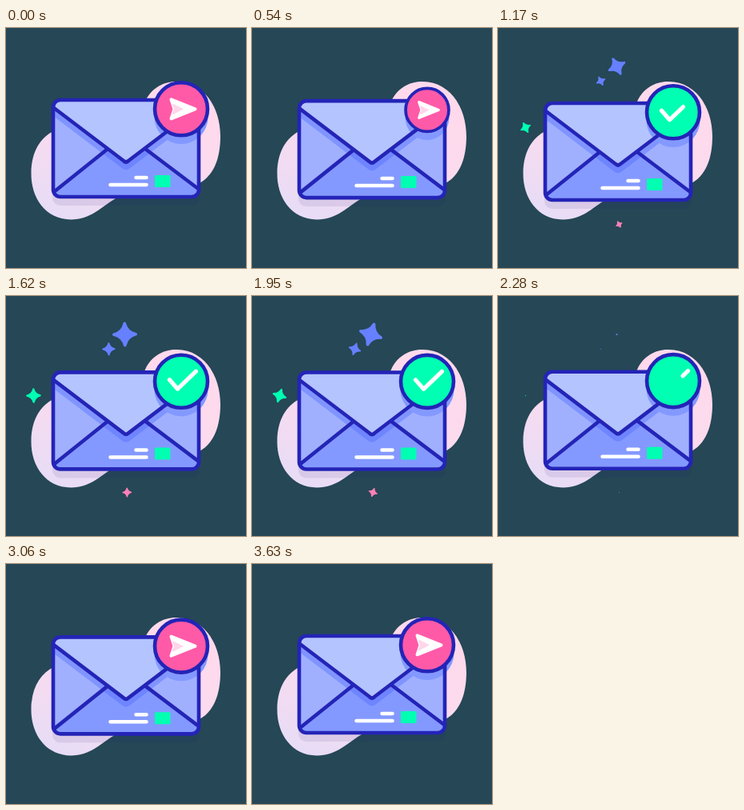
Write an HTML page that moves like this. It is 300 px wide and 300 px high and loops after 3660 ms.

```html
<!DOCTYPE html>
<html lang="en">
<head>
<meta charset="utf-8">
<title>Message sent</title>
<style>
  html, body { margin: 0; width: 100%; height: 100%; overflow: hidden; background: #254756; }
  svg { display: block; width: 100vw; height: 100vh; }
  .line { fill: none; stroke: #2424b7; stroke-width: 4.6; stroke-linejoin: round; stroke-linecap: round; }
  .white { fill: none; stroke: #fff; stroke-linecap: round; stroke-linejoin: round; }
</style>
</head>
<body>
<svg viewBox="0 0 300 300">
  <defs>
    <linearGradient id="blobFill" x1="0.8" y1="0" x2="0.2" y2="1">
      <stop offset="0" stop-color="#ffd9eb"/>
      <stop offset="0.5" stop-color="#fbdbee"/>
      <stop offset="1" stop-color="#e8dcf6"/>
    </linearGradient>
    <clipPath id="bodyClip"><rect x="59" y="90" width="182" height="121" rx="9"/></clipPath>
    <clipPath id="badgeClip"><circle r="33"/></clipPath>
    <clipPath id="planeClip"><path d="M-15 -14 L20 0 L-15 14 L-9 0Z"/></clipPath>
  </defs>

  <path fill="url(#blobFill)" d="M212 67 C246 66 268 98 268 135 C268 163 260 185 240 195 C200 203 160 201 137 213 C116 226 106 239 81 239.500 C49 239 31 212 31.500 181 C32 154 43 137 60 128.500 C110 115 162 118 174 92 C181 76 196 67 212 67Z"/>

  <g id="mail">
    <rect x="58" y="99" width="184" height="123" rx="10" fill="#1e1e6e" fill-opacity="0.09"/>
    <g id="blobShade"><circle r="33.500" fill="#8499fc"/></g>
    <g clip-path="url(#bodyClip)">
      <rect x="59" y="90" width="182" height="121" fill="#a0b0ff"/>
      <path fill="#8499ff" d="M59 205 L150 132 L241 202 V212 H59Z"/>
      <path fill="#465fff" fill-opacity="0.35" d="M59 90 V110 L144 174.500 Q150 180 156 174.500 L241 110 V90Z"/>
      <path fill="#b4c4ff" d="M59 90 V100 L150 168 L241 100 V90Z"/>
      <g id="mailShade"><circle r="33.500" fill="#8499ff"/></g>
    </g>
    <path class="line" d="M61 204 L126 152 M239 200 L174 151"/>
    <path class="line" d="M60 100 L147 166 Q150 169 153 166 L240 100"/>
    <rect class="line" x="59" y="90" width="182" height="121" rx="9"/>
    <path class="white" stroke-width="4.500" d="M162.500 187 H175.500 M130.500 196 H175.500"/>
    <rect x="186" y="184" width="19.500" height="15" rx="1.500" fill="#00ffb2"/>

    <g id="badge">
      <g clip-path="url(#badgeClip)">
        <circle r="33" fill="#ff5aa8"/>
        <circle id="green" r="33" fill="#00ffb2"/>
        <g id="plane">
          <path fill="#fff" stroke="#fff" stroke-width="4" stroke-linejoin="round" d="M-12.500 -12 L17.500 0 L-12.500 12 L-8.500 0Z"/>
          <path fill="#ffd6e9" clip-path="url(#planeClip)" d="M-13 -6 H-9 L3 0 L-9 6.500 H-13Z"/>
        </g>
        <path id="check" class="white" stroke-width="5.200"/>
      </g>
      <circle class="line" r="33"/>
    </g>
  </g>
  <g id="stars"></g>
</svg>
<script>
const LOOP = 3660;
const $ = id => document.getElementById(id);
const clamp = v => Math.max(0, Math.min(1, v));
const span = (t, a, b) => clamp((t - a) / (b - a));
const easeOut = u => 1 - (1 - u) ** 2;
const easeIn = u => u * u;
const smooth = u => u < 0.5 ? 2 * u * u : 1 - 2 * (1 - u) ** 2;
const place = (el, x, y, s = 1, r = 0) =>
  el.setAttribute('transform', `translate(${x} ${y}) rotate(${r}) scale(${s})`);

// x, y, radius, colour
const stars = [
  [148.5, 48, 15.5, '#6680ff'],
  [128.5, 66.3, 8.2, '#6680ff'],
  [34.5, 124.5, 9.3, '#00ffb2'],
  [151.3, 245.5, 6, '#ff80b8']
].map(([x, y, size, color]) => {
  const el = document.createElementNS('http://www.w3.org/2000/svg', 'path');
  el.setAttribute('d', 'M0 -.88 Q.17 -.17 .88 0 Q.17 .17 0 .88 Q-.17 .17 -.88 0 Q-.17 -.17 0 -.88Z');
  el.setAttribute('fill', color);
  el.setAttribute('stroke', color);
  el.setAttribute('stroke-width', 0.24);
  el.setAttribute('stroke-linejoin', 'round');
  $('stars').append(el);
  return { el, x, y, size };
});

const CHECK = [[-14.5, -2], [-4.5, 9.5], [18.5, -12.5]];
const mix = (a, b, u) => [a[0] + (b[0] - a[0]) * u, a[1] + (b[1] - a[1]) * u];
const BEND = 0.32;

function checkPoint(u) {
  const [a, b, c] = CHECK;
  return u < BEND ? mix(a, b, u / BEND) : mix(b, c, (u - BEND) / (1 - BEND));
}

function checkPath(from, to) {
  if (to - from < 0.01) return '';
  const pts = [checkPoint(from)];
  if (from < BEND && to > BEND) pts.push(CHECK[1]);
  pts.push(checkPoint(to));
  return 'M' + pts.map(p => p.join(' ')).join('L');
}

// Shrinks the badge to 80% and lets it grow back
const dip = (t, a, b, c) => 0.2 * (smooth(span(t, a, b)) - smooth(span(t, b, c)));

function draw(t) {
  const bob = 2.8 * (1 - Math.cos(2 * Math.PI * t / LOOP));
  place($('mail'), 0, bob);

  const s = 1 - dip(t, 270, 610, 1050) - dip(t, 2360, 2640, 2980);
  place($('badge'), 219, 101.3, s);
  for (const id of ['blobShade', 'mailShade']) place($(id), 219, 111.5, s);

  const enter = easeOut(span(t, 760, 1260));
  const leave = smooth(span(t, 2470, 2920));
  place($('green'), -70 * (1 - enter) + 70 * leave, 0);

  const fly = t < 1800
    ? 62 * easeIn(span(t, 580, 900))
    : -62 * (1 - easeOut(span(t, 2600, 3030)));
  place($('plane'), fly, 0);

  const from = smooth(span(t, 1950, 2430));
  const to = easeOut(span(t, 900, 1370));
  $('check').setAttribute('d', checkPath(from, to));

  const grow = easeOut(span(t, 950, 1380)) * easeOut(1 - span(t, 1890, 2300));
  const turn = (t - 1640) * 0.057;
  for (const { el, x, y, size } of stars) {
    place(el, x, y, size * grow, turn);
    el.style.display = grow > 0 ? '' : 'none';
  }
}

function tick() {
  draw(performance.now() % LOOP);
  requestAnimationFrame(tick);
}
tick();
</script>
</body>
</html>
```
